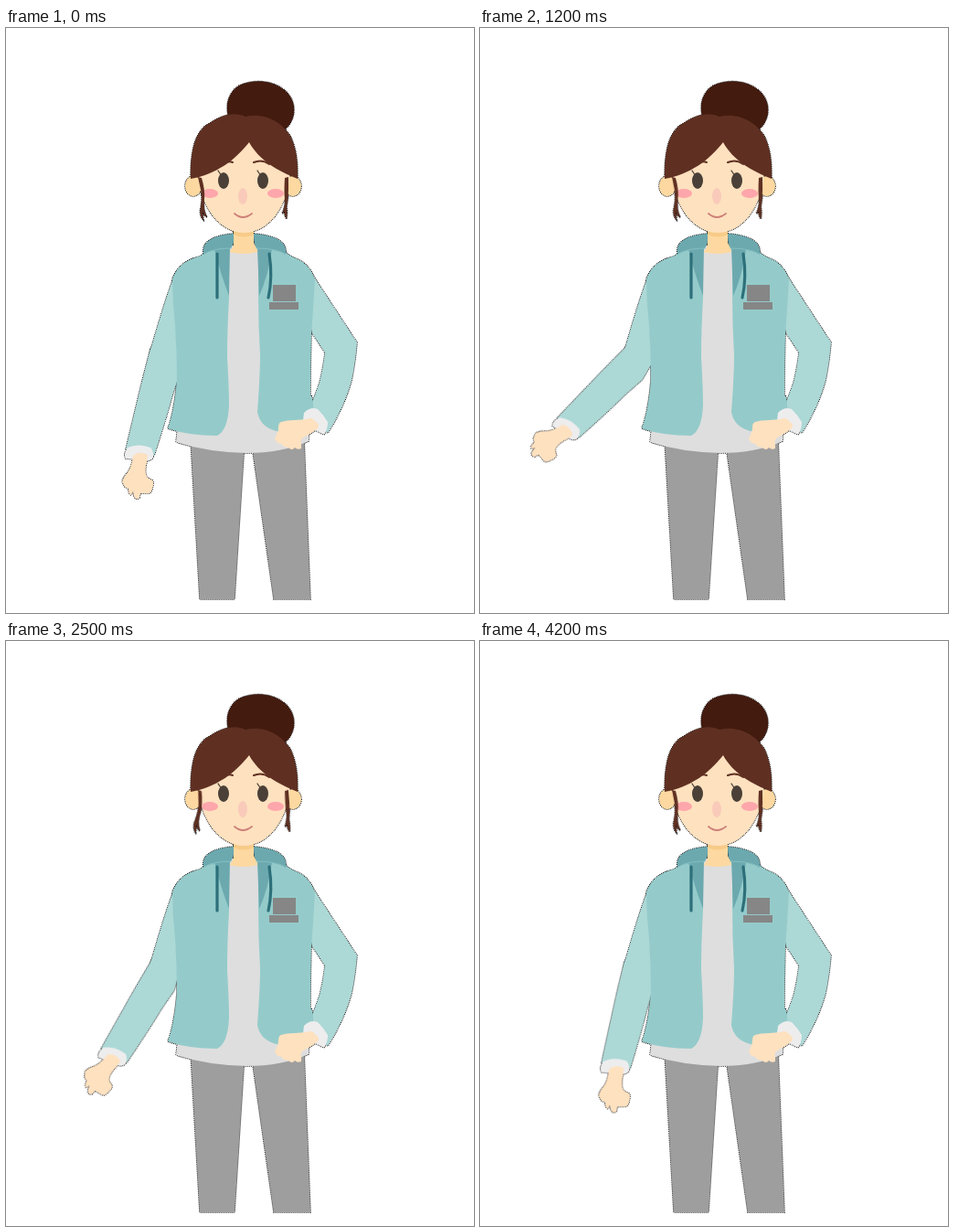
These frames come from a looping animation (512 px wide and 640 px high, 4250 ms). An HTML page:

```html
<!DOCTYPE html>
<html lang="en">
<head>
<meta charset="utf-8">
<title>Woman swinging her arm</title>
<style>
  html, body { margin: 0; width: 100%; height: 100%; overflow: hidden; background: #fff; }
  svg { display: block; width: 512px; height: 640px; }
  .bun { fill: #431b0f; }
  .hair, .lock { fill: #5f3022; }
  .skin { fill: #fee1bf; }
  .neck { fill: #fdd9a1; }
  .coat { fill: #94cbca; }
  .sleeve { fill: #acd8d6; }
  .hood { fill: #6ca9af; }
  .cuff { fill: #ededee; }
  .shirt { fill: #dedede; }
  .legs { fill: #9e9e9e; }
  .badge { fill: #868686; }
  .cheek { fill: #fda6ab; }
  .eye { fill: #4a4038; }
  .line { fill: none; stroke-linecap: round; }
  .arm { transform-origin: 171px 358px; }
  .hand { transform-origin: 150px 468px; }
  .lockL { transform-origin: 212px 164px; }
  .lockR { transform-origin: 307px 164px; }
  /* dotted contour, seen only where it sticks out behind the figure */
  .edge * { stroke: #000; stroke-width: 1.6; stroke-dasharray: 1 1; }
</style>
</head>
<body>
<svg viewBox="0 0 512 640">
  <g id="figure">
    <path class="bun" d="M245 101C239 88 242 71 255 63C269 56 290 57 302 66C314 74 318 88 313 100Q310 107 306 110L262 102Z"/>
    <path class="legs" d="M202 450L212 625H250L260.500 460ZM269.500 460L293 625H333L326 448Z"/>

    <path class="sleeve" d="M205 252Q188 260 183 274C173 301 166 326 160 346Q156 356 158 364Q163 373 174 372L192 368V262Z"/>
    <g class="arm">
      <path class="sleeve" d="M158 351Q152 374 147 394L131 461L162 468Q176 425 182 402L190 378V358L172 344Z"/>
      <path class="cuff" d="M133 459Q145 454 158 459Q162 463 161 470Q157 475 150 473L131 471Q128 466 133 459Z"/>
      <path class="hand skin" d="M139 468Q146 462 155 467L154 475Q152 482 153 488Q154 493 159 494Q162 496 161 500L160 504Q159 509 155 509L147 509L146 514Q142 517 140 512L139 507L137 511Q134 510 134 504L130 502L127 496Q129 490 134 485Q138 478 139 468Z"/>
    </g>

    <path class="shirt" d="M244 238L276 238L300 430L331 440L331 452Q302 465 263 465Q220 464 186 453L188 436L230 420Z"/>
    <path class="sleeve" d="M322 258Q331 264 338 274L384 344Q382 367 378 386Q370 415 352 443L328 425Q337 406 343 388Q347 372 349 355L335 334L328 300Z"/>
    <path class="coat" d="M218 244Q216 249 208 251Q188 257 182 275Q182 300 185 325Q187 355 187 385Q184 420 177 438Q199 446 231 446Q243 440 244 412Q244 395 242 360Q242 330 244 295L244 240Z"/>
    <path class="coat" d="M276 240L306 245Q309 249 317 252Q332 258 338 275Q336 310 334 335Q333 370 333 402Q337 402 336 430Q320 442 300 442Q278 438 275 420Q278 380 278 358Q276 325 276 290Z"/>
    <path class="neck" d="M249 216H271V235Q275 241 275 245Q260 249 244 245Q249 241 249 235Z"/>
    <path fill="#f7cb88" d="M249 222H271V226Q260 231 249 226Z"/>
    <path class="hood" d="M249 225Q223 227 217 238Q215 243 216 248Q224 242 246 241Q250 236 249 225ZM271 225Q297 227 304 237Q307 242 306 248Q298 242 274 241Q271 236 271 225Z"/>
    <path class="hood" d="M228 242L245 240L244 293Q235 270 228 242ZM275 240L291 242Q287 271 277 293Z"/>
    <path class="line" stroke="#84bfc1" stroke-width="1" d="M217 247Q226 241 246 241M274 241Q296 241 305 247"/>
    <path class="line" stroke="#2d707a" stroke-width="3.200" d="M231 247V295M288 247Q292 273 287 295"/>
    <path class="badge" d="M292 281H317V299H292ZM288 300H320V308H288Z"/>

    <path class="cuff" d="M326 421Q333 414 341 417Q348 424 352 431Q352 439 348 445L338 440L325 429Z"/>
    <path class="skin" d="M301 431Q307 429 316 429L329 428Q335 425 339 431Q344 434 341 438Q334 444 327 447Q321 450 323 455L323 460Q319 462 316 459Q313 463 309 459L304 458L300 454Q297 456 294 449Q298 442 298 437Q298 432 301 431Z"/>

    <ellipse class="neck" cx="205" cy="173" rx="9" ry="11"/>
    <ellipse class="neck" cx="314" cy="173" rx="9" ry="11"/>
    <path class="skin" d="M210 150C209 196 235 224 260 224C286 224 311 197 311 150L266 112Z"/>
    <ellipse class="cheek" cx="223" cy="181" rx="9" ry="5"/>
    <ellipse class="cheek" cx="295" cy="181" rx="9" ry="5"/>
    <path class="lock lockL" d="M210 163L214 164Q218 177 217 187Q215 198 220 207Q216 205 215 200L216 210Q211 205 213 196Q215 186 213 177Z"/>
    <path class="lock lockR" d="M309 163L305 164Q304 180 305 187Q306 194 302 203Q304 203 305 200Q304 205 307 209Q308 201 307 195Q309 186 309 177Z"/>
    <path class="hair" d="M202 165C202 138 205 113 223 104C235 96 249 91 262 97C283 92 303 103 312 120C319 136 319 151 319 165C297 156 277 145 266 125C250 145 230 160 202 165Z"/>
    <path class="line" stroke="#5f3022" stroke-width="2" d="M239 149Q243 145 248 147M271 147Q280 143 288 149"/>
    <ellipse class="eye" cx="238" cy="167" rx="6" ry="9"/>
    <ellipse class="eye" cx="281" cy="167" rx="6" ry="9"/>
    <path class="line" stroke="#4a4038" stroke-width="1.300" d="M232 156L236 162M275 156L279 162"/>
    <ellipse cx="259" cy="184" rx="5" ry="9" fill="#f9cab9"/>
    <path class="line" stroke="#cd7f78" stroke-width="1.800" d="M250 203Q259 211 269 203"/>
  </g>
</svg>
<script>
  const figure = document.getElementById('figure');
  const edge = figure.cloneNode(true);
  edge.removeAttribute('id');
  edge.setAttribute('class', 'edge');
  figure.before(edge);

  // Angles in degrees every 250 ms; each interval moves in 50 ms steps.
  function swing(selector, angles, scale = 1) {
    const transform = angles.map(a => `rotate(${a * scale}deg)`);
    for (const part of document.querySelectorAll(selector)) {
      part.animate({ transform, easing: 'steps(5)' }, { duration: 4250, iterations: Infinity });
    }
  }

  const sway = [0, .3, 1, .85, .4, 0, 0, .4, .8, .85, .75, .3, 0, .2, .9, .85, .4, 0];
  swing('.arm', [0, 6.5, 13.3, 19.5, 25.5, 31.5, 38, 38.5, 32, 24, 16, 8, .5, -5, -8.5, -9, -5.5, 0]);
  swing('.hand', [0, 1, 4, 9, 15, 20.5, 22, 22, 22, 18, 14, 12, 10, 6, 3, 0, -1.5, 0]);
  swing('.lockL', sway, 14);
  swing('.lockR', sway, -6);
</script>
</body>
</html>
```
